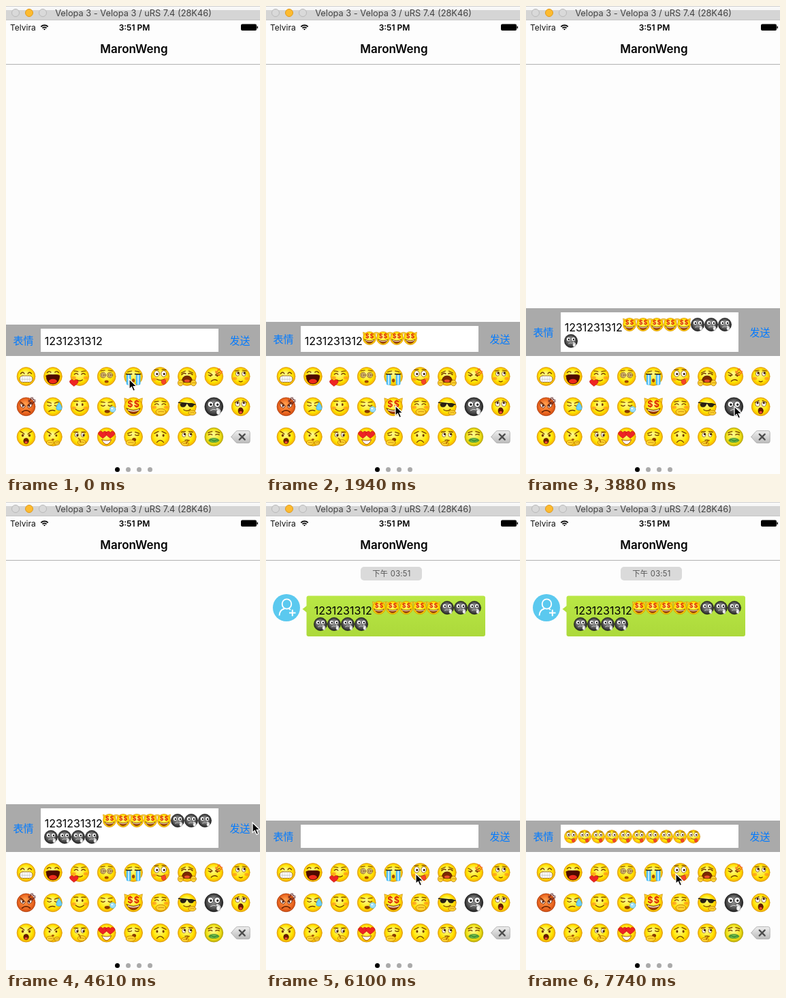
An HTML page with a canvas for the animation above (8000 ms loop, 373x686 px).

```html
<!DOCTYPE html>
<html lang="zh">
<head>
<meta charset="utf-8">
<title>Emoji chat</title>
<style>
html, body { margin: 0; width: 100%; height: 100%; overflow: hidden; background: #fdfdfd; }
canvas { display: block; width: 373px; height: 686px; }
</style>
</head>
<body>
<canvas id="stage"></canvas>
<script>
const W = 373, H = 686, LOOP = 8000;
const canvas = document.getElementById('stage');
const g = canvas.getContext('2d');
const dpr = window.devicePixelRatio || 1;
canvas.width = W * dpr;
canvas.height = H * dpr;

const SANS = 'Inter, "Noto Sans CJK SC", "Noto Sans CJK", sans-serif';
const CJK = '"Noto Sans CJK SC", "Noto Sans CJK", sans-serif';
const BROWN = '#743c00', RED = '#dd2408', GOLD = '#ffd62a', RIM = '#d39200', SKIN = '#b87400';

// ---------- drawing helpers ----------
function paint(fill, stroke, w = 1) {
  if (fill) { g.fillStyle = fill; g.fill(); }
  if (stroke) { g.strokeStyle = stroke; g.lineWidth = w; g.stroke(); }
}
function oval(x, y, rx, ry, fill, stroke, w) {
  g.beginPath();
  g.ellipse(x, y, rx, ry, 0, 0, Math.PI * 2);
  paint(fill, stroke, w);
}
// Chain of quadratic segments: x, y, then (cx, cy, x, y)...
function curve(p, stroke, w, fill) {
  g.beginPath();
  g.moveTo(p[0], p[1]);
  for (let i = 2; i < p.length; i += 4) g.quadraticCurveTo(p[i], p[i + 1], p[i + 2], p[i + 3]);
  paint(fill, stroke, w);
}
function poly(p, fill, stroke, w) {
  g.beginPath();
  for (let i = 0; i < p.length; i += 2) g.lineTo(p[i], p[i + 1]);
  g.closePath();
  paint(fill, stroke, w);
}
function box(x, y, w, h, fill, r = 0, stroke) {
  g.beginPath();
  g.roundRect(x, y, w, h, r);
  paint(fill, stroke);
}
function text(s, x, y, size, color, { align = 'left', weight = 400, family = SANS, gap = 0 } = {}) {
  g.font = `${weight} ${size}px ${family}`;
  g.letterSpacing = gap + 'px';
  g.textAlign = align;
  g.fillStyle = color;
  g.fillText(s, x, y);
}
function both(fn) { fn(-1); fn(1); }

// ---------- emoji parts, in a box of about 28 units ----------
function ball(hi = '#fffa8a', mid = '#ffe500', low = '#f5ab00', rim = RIM) {
  const c = g.createRadialGradient(-1.5, -4, 1, 0, 0, 13.6);
  c.addColorStop(0, hi);
  c.addColorStop(0.7, mid);
  c.addColorStop(1, low);
  oval(0, 0, 13.4, 13.4, c, rim, 0.7);
}
const eyes = (dx, y, rx = 1.5, ry = 2, c = BROWN) => both(s => oval(s * dx, y, rx, ry, c));
const lids = (y, bend, c = BROWN) => both(s => curve([s * 2.5, y, s * 5, y + bend, s * 8, y], c, 1.3));
const brows = (inner, outer, c = BROWN) => both(s => curve([s * 2.5, inner, s * 5, (inner + outer) / 2 - 0.5, s * 8.5, outer], c, 1.2));
const mouth = (y, w, bend) => curve([-w, y, 0, y + bend, w, y], BROWN, 1.3);
const cheeks = (y = 3) => both(s => oval(s * 8.5, y, 3, 2.2, 'rgba(255,110,40,.5)'));
function bigEyes(y = -4, r = 3.6, px = 0, py = 0, dx = 4.6) {
  both(s => {
    oval(s * dx, y, r, r + 0.5, '#fff', BROWN, 0.7);
    oval(s * dx + px, y + py, 1.5, 1.7, '#3a1c00');
  });
}
function heart(x, y, r) {
  curve([x, y + r, x - 2 * r, y - r * 0.3, x - r * 0.7, y - r * 0.8, x - r * 0.1, y - r, x, y - r * 0.3,
    x + r * 0.1, y - r, x + r * 0.7, y - r * 0.8, x + 2 * r, y - r * 0.3, x, y + r], '#b40d0d', 0.5, '#ee2424');
}
function hand(x, y, rx = 4.5, ry = 3.5) {
  oval(x, y, rx, ry, '#ffd530', SKIN, 0.8);
  curve([x - rx * 0.5, y, x, y - 1, x + rx * 0.6, y], SKIN, 0.7);
}
function anger(x, y, c) {
  both(s => {
    curve([x + s, y - 5, x + s, y - s, x + s * 5, y - 1], c, 1.2);
    curve([x + s, y + 5, x + s, y + 1, x + s * 5, y + 1], c, 1.2);
  });
}
function drop(x, y, r) {
  curve([x, y - r * 1.8, x + r * 2, y + r, x, y + r, x - r * 2, y + r, x, y - r * 1.8], '#2a9ad8', 0.6, '#6cd0fb');
}
function openMouth(y, rx, ry) {
  oval(0, y, rx, ry, '#6a1c00', '#4b1600', 0.7);
  oval(0, y + ry * 0.5, rx * 0.6, ry * 0.42, '#f04a34');
}

const faces = {
  grin() {
    ball(); lids(-4, -4);
    box(-9.5, -1, 19, 9.5, '#fff', 4.5, '#a06a10');
    curve([-9, 4, 0, 4.5, 9, 4], '#b5b5b5', 0.7);
    for (let x = -5; x <= 5; x += 3.3) curve([x, -1, x, 4, x, 8.5], '#c4c4c4', 0.6);
  },
  laugh() {
    ball();
    both(s => curve([s * 3, -6, s * 5, -9, s * 8.5, -5.5], BROWN, 1.4));
    curve([-10, -1, -9, -3, 0, -2.5, 9, -3, 10, -1, 9, 11, 0, 11, -9, 11, -10, -1], '#5a1800', 0.9, '#4e0a00');
    oval(0, 7, 6, 3.3, '#ee2c1c');
  },
  love() {
    ball(); cheeks(2); brows(-7, -8); lids(-3, -3); mouth(5, 4, 3);
    heart(-8.5, 9, 5.3);
  },
  dizzy() {
    ball(); brows(-9, -8);
    both(s => { for (const r of [4, 2.4, 0.8]) oval(s * 5, -2, r, r, r > 3 ? '#fff6b0' : null, BROWN, 0.8); });
    oval(0, 7.5, 3, 2, '#a34a00');
  },
  cry() {
    ball(); brows(-8, -6.5);
    both(s => {
      box(s * 7 - 3.4, -3, 6.8, 15.5, '#4dbdf8', 2);
      curve([s * 7, -2, s * 7, 4, s * 7, 11], '#c9efff', 2);
      curve([s * 2.5, -3.5, s * 6, -3, s * 10.5, -3.5], '#2c1a0a', 1.7);
    });
    oval(0, 6, 2.2, 2.8, '#a34800');
  },
  yum() {
    ball(); cheeks(4); brows(-10, -9.5); bigEyes(-4, 3.9, 0.5, 0.4, 5.2);
    curve([-5, 4, 0, 7, 6, 4], BROWN, 1.2);
    curve([1.5, 5.5, 1.5, 12.5, 6, 11.5, 10.5, 9.5, 7, 4], '#c42810', 0.6, '#f5452a');
  },
  wail() {
    ball(); brows(-8, -5); both(s => curve([s * 2, -4, s * 5, -6, s * 8, -2.5], BROWN, 1.6));
    curve([-8, 8, -7, -1, 0, -1, 7, -1, 8, 8, 0, 10, -8, 8], '#5a1c00', 0.8, '#7a2a00');
    oval(0, 6.5, 4, 2, '#e8502c');
    both(s => hand(s * 9.5, 9.5, 4, 4.3));
  },
  annoyed() {
    ball(); brows(-2.5, -6); lids(-2, 1); eyes(5, -1, 1.3, 1.3);
    curve([-4, 7, 0, 3, 5, 6], BROWN, 1.4);
    anger(7.5, -6.5, '#f4581c');
  },
  blush() {
    ball(); cheeks(3); brows(-9, -8); bigEyes(-4, 2.8, 0.8, -1); mouth(7, 2.5, 1.5);
  },
  rage() {
    ball('#ff9c4c', '#ef6c24', '#d04c12', '#a83c0a');
    both(s => poly([s * 1.5, -1, s * 9, -5, s * 8, 0, s * 4, 2], '#fff', '#6a2200', 0.8));
    eyes(4.6, -1, 1.2, 1.3, '#300'); brows(-2, -7, '#5a1c00');
    curve([-6, 8, 0, 3, 6, 8], '#5a1c00', 1.5);
    anger(8.5, -8.5, '#5b2020');
  },
  sweat() {
    ball(); brows(-5, -7); lids(-2, 2); curve([-6, 7, -2, 4, 3, 6], BROWN, 1.4);
    drop(9, 1, 4.2);
  },
  smug() { ball(); brows(-8, -8); eyes(4, -3, 1.3, 2); cheeks(2); mouth(4, 6, 5); },
  sleepy() {
    ball(); brows(-6, -7); lids(-2, 2.5); oval(1, 7, 4, 2.4, '#8a3a00');
    oval(9, 4, 4.2, 4.2, '#9fe0fb', '#4cabd8', 0.7); oval(8, 2.8, 1.2, 1.2, '#fff');
  },
  money() {
    both(s => poly([s * 6, -10, s * 13.2, -12.5, s * 12, -4], GOLD, RIM, 0.8));
    ball();
    both(s => text('$', s * 4.7, 0.6, 12.5, RED, { align: 'center', weight: 700 }));
    curve([-10, 2.5, 0, 8, 10, 2.5, 6, 10.5, 0, 10.5, -6, 10.5, -10, 2.5], BROWN, 1, '#a03a00');
    curve([-8, 4.6, 0, 8.6, 8, 4.6], '#fff', 1.2);
  },
  giggle() { ball(); cheeks(1); brows(-8, -7); lids(-3, -3); hand(1, 7.5, 7.5, 4.5); },
  cool() {
    ball();
    curve([-12.5, -6, 0, -5, 12, -3], '#161616', 1.4);
    both(s => curve([s, -4, s * 6, -6, s * 10, -4, s * 10, 0.5, s * 6, 0.5, s * 2, 0.5, s, -4], '#111', 0.6, '#2c2214'));
    curve([-5, 4.5, 0, 8, 5, 4], BROWN, 1.3); hand(7.5, 9, 5.5, 3.5);
  },
  spy() {
    ball('#a2a2a2', '#505050', '#1e1e1e', '#161616');
    both(s => { oval(s * 4.9, -3.5, 4.3, 4.5, '#fff', '#222', 0.8); oval(s * 4.9 + 0.5, -3, 1.6, 1.8, '#111'); });
    curve([-5, 5.5, -1, 3, 3, 4.5], '#ddd', 1);
    curve([5, 3.5, 11, 5, 8, 11], '#ececec', 2.8);
    oval(6.5, 8, 2.8, 3.8, '#f2f2f2', '#666', 0.5);
  },
  scared() { ball(); brows(-9, -6); bigEyes(-4, 3.2, 0, -1.5); openMouth(6, 3.6, 4.5); },
  shout() { ball(); brows(-4, -8); eyes(5, -2, 1.7, 2); openMouth(6, 3.7, 4); },
  shush() { ball(); brows(-4, -8); eyes(5, -2, 1.4, 1.6); oval(0, 4, 2, 1.4, '#a34800'); hand(-4, 8.5, 5.5, 3.8); hand(6, 9, 4, 3); },
  hush() { ball(); brows(-7, -7); bigEyes(-3, 2.6, 1, 0.5); hand(3, 8, 6, 4); curve([1, 7, 0, 3, -2, 2], SKIN, 1.8); },
  hearts() {
    ball(); both(s => heart(s * 5.5, -3.5, 5.6));
    curve([-7, 4, 0, 7, 7, 4, 4, 11, 0, 11, -4, 11, -7, 4], '#8d2800', 0.8, '#fff');
  },
  yawn() { ball(); brows(-7, -5); lids(-3, 2); oval(1, 4, 3, 2.6, '#8a3a00'); hand(-4, 8.5, 7, 4.2); },
  sad() { ball(); brows(-8, -5); eyes(4.6, -2, 1.5, 2); mouth(8, 5, -6); },
  think() { ball(); brows(-8, -7); bigEyes(-3, 2.6, 1, -1); mouth(5, 3, -1); hand(-3, 10, 5.5, 3.2); curve([-1, 9, 0, 6, 3, 5], SKIN, 1.8); },
  sick() {
    ball('#fffa8a', '#f1e41c', '#c6b200', '#a59200'); lids(-3, -2); brows(-8, -6);
    oval(0, 5, 7.5, 3, '#6cba48', '#3d8a30', 0.8);
    curve([-6, 5, -4, 3, -2, 5, 0.5, 7, 3, 5, 4.5, 3.5, 6, 5], '#256a24', 1);
  },
  erase() {
    const c = g.createLinearGradient(0, -9, 0, 9);
    c.addColorStop(0, '#eee');
    c.addColorStop(1, '#bcbcbc');
    curve([-14, 0, -9, -6, -7, -8, -6, -9, -4, -9, 8, -9, 11, -9, 13.5, -9, 13.5, -6, 13.5, 0, 13.5, 6,
      13.5, 9, 11, 9, 4, 9, -4, 9, -6, 9, -7, 8, -9, 6, -14, 0], '#a5a5a5', 0.8, c);
    both(s => curve([2 - s * 4, -4, 2, 0, 2 + s * 4, 4], '#4c4c4c', 2.2));
  }
};
const order = Object.keys(faces);

function emoji(name, x, y, scale = 1) {
  g.save();
  g.translate(x, y);
  g.scale(scale, scale);
  g.lineCap = 'round';
  faces[name]();
  g.restore();
}
const inline = (name, x, y) => emoji(name, x, y, 0.72);

// Digits, then emojis that wrap after eight
function message(list, x, y) {
  text('1231231312', x + 0.7, y + 9.8, 16, '#000');
  list.forEach((name, i) => i < 8
    ? inline(name, x + 96 + i * 20, y)
    : inline(name, x + 10 + (i - 8) * 20, y + 24));
}

// ---------- timeline ----------
const taps = {
  money: [1200, 1650, 1800, 1940, 2090],
  spy: [3430, 3580, 3730, 3880, 4020, 4320, 4470],
  yum: [6390, 6540, 6690, 6840, 6990, 7140, 7290, 7440, 7590, 7740]
};
const SENT = 4900, RELEASED = 5050;
const moves = [
  [0, 181, 547], [150, 193, 569], [1050, 190, 586], [2240, 250, 586], [2390, 318, 586],
  [3280, 306, 587], [4610, 362, 470], [5050, 338, 506], [5200, 262, 548], [5350, 231, 560], [6100, 220, 545]
];
const typed = (name, t) => taps[name].filter(at => at <= t).map(() => name);

// ---------- scene ----------
function header() {
  box(0, 0, W, 1, '#d0d0d0');
  box(0, 1, W, 5, '#f8f8f8');
  box(0, 6, W, 14, '#d5d5d5');
  box(0, 20, W, 1, '#c6c6c6');
  [14, 34, 54].forEach((x, i) => oval(x, 10, 5.5, 5.5, i === 1 ? '#fdbb30' : '#d9d9d9', i === 1 ? '#e09a1c' : '#b9b9b9'));
  text('Velopa 3 - Velopa 3 / uRS 7.4 (28K46)', 187, 15, 12.8, '#434343', { align: 'center' });

  text('Telvira', 6, 35.5, 12, '#111');
  for (const r of [2, 5, 8]) {
    g.beginPath();
    g.arc(56.5, 35.5, r - 0.7, -Math.PI * 0.75, -Math.PI * 0.25);
    paint(null, '#000', 1.8);
  }
  text('3:51 PM', 188.5, 35.5, 12, '#000', { align: 'center', weight: 600 });
  box(345, 26.5, 23, 9.5, '#000', 2);
  box(368.5, 29.5, 1.5, 3.5, '#000', 1);
  text('MaronWeng', 188, 69, 17, '#000', { align: 'center', weight: 600 });
  box(0, 85, W, 1, '#b2b2b2');
}

function chat() {
  box(139, 95, 90, 20, '#dadada', 5);
  text('下午 03:51', 184.5, 109, 11.2, '#555', { align: 'center', gap: 0.3 });

  oval(30, 155, 20, 20, '#5bc9ef');
  oval(30.5, 149.5, 6.8, 7.2, null, '#fff', 1.8);
  curve([19.5, 166.5, 20, 158, 27, 156.5], '#fff', 1.8);
  curve([33.5, 156.5, 35, 157, 36, 158], '#fff', 1.8);
  box(34, 161.5, 9.5, 2, '#fff');
  box(37.8, 157.8, 2, 9.5, '#fff');

  const c = g.createLinearGradient(0, 138, 0, 197);
  c.addColorStop(0, '#b9e745');
  c.addColorStop(1, '#acd93b');
  poly([60, 152, 53.5, 157, 60, 162], '#b2e03f');
  box(59.5, 137.5, 262.5, 59.5, c, 3);
  message([...taps.money, ...taps.spy].map((_, i) => i < 5 ? 'money' : 'spy'), 70, 155);
}

function inputBar(t) {
  const sent = t >= SENT;
  const draft = [...typed('money', t), ...typed('spy', t)];
  const top = sent || !draft.length ? 467 : draft.length > 8 ? 443 : 463;
  const base = (top + 513) / 2 + 5.5;
  box(0, top, W, 513 - top, '#aaa');
  box(51, top + 6, 261, 501 - top, '#fff');
  text('表情', 10.5, base, 15, '#007aff', { family: CJK });
  text('发送', 328.5, base, 15, sent && t < RELEASED ? '#8e9fb5' : '#007aff', { family: CJK });
  if (sent) typed('yum', t).forEach((name, i) => inline(name, 66 + i * 20, 490.5));
  else message(draft, 56, draft.length ? top + 24 : 487);
}

function panel() {
  order.forEach((name, i) => emoji(name, 29.5 + (i % 9) * 39.4, 543 + Math.floor(i / 9) * 44.3));
  for (let i = 0; i < 4; i++) oval(163.5 + i * 16, 679.5, 3.5, 3.5, i ? '#aaa' : '#000');
}

function pointer(t) {
  const [, x, y] = moves.filter(m => m[0] <= t).pop();
  g.save();
  g.translate(x, y);
  poly([0, 0, 0, 14.5, 3.4, 11.4, 6, 17.4, 8.6, 16.2, 6.1, 10.5, 10.8, 10.5], '#000', '#fff', 1.2);
  g.restore();
}

function draw(now) {
  const t = now % LOOP;
  g.setTransform(dpr, 0, 0, dpr, 0, 0);
  box(0, 0, W, H, '#fdfdfd');
  header();
  if (t >= SENT) chat();
  inputBar(t);
  panel();
  pointer(t);
}

const start = performance.now();
function tick() {
  draw(performance.now() - start);
  requestAnimationFrame(tick);
}
tick();
</script>
</body>
</html>
```
